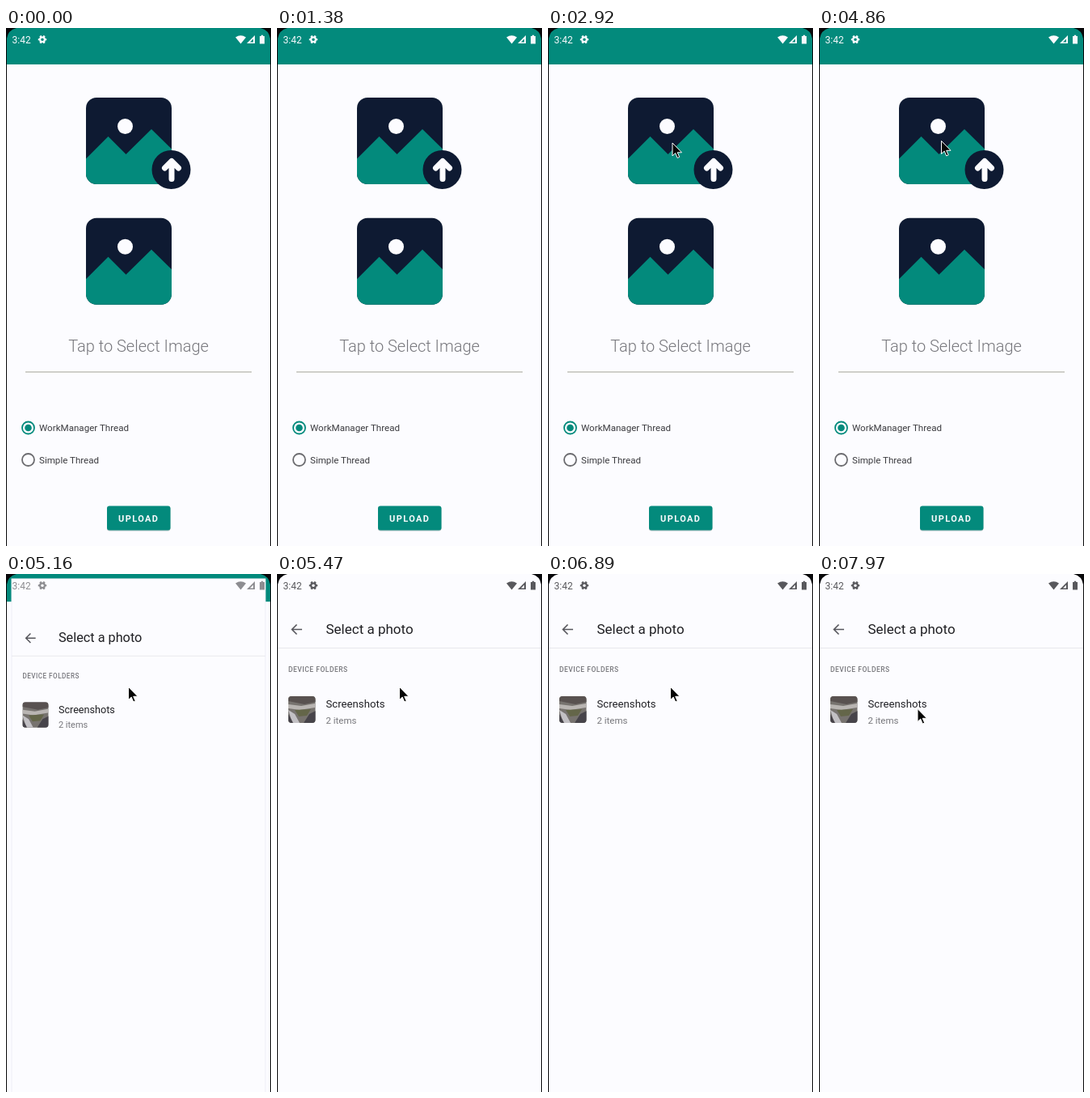
Write an HTML page that moves like this. It is 328x640 px and loops after 7990 ms.

```html
<!DOCTYPE html>
<html lang="en">
<head>
<meta charset="utf-8">
<title>Image upload</title>
<style>
  html, body { margin: 0; width: 100%; height: 100%; overflow: hidden; background: #fcfcff; }
  svg { display: block; width: 328px; height: 640px; font-family: Roboto, sans-serif;
    --paper: #fcfcff; --teal: #038a7c; --navy: #0e1a32; --ink: #202024; --grey: #77777c; }
  .paper { fill: var(--paper); }
  .teal { fill: var(--teal); }
  .navy { fill: var(--navy); }
  .ink { fill: var(--ink); }
  .grey { fill: var(--grey); }
  .line { fill: none; }
</style>
</head>
<body>
<svg viewBox="0 0 328 640">
  <defs>
    <clipPath id="tile"><rect x="99" y="86" width="106" height="107" rx="13"/></clipPath>
    <clipPath id="thumb"><rect x="14" y="151" width="33.5" height="33" rx="4"/></clipPath>
    <g id="picture">
      <g clip-path="url(#tile)">
        <rect class="navy" x="99" y="85" width="107" height="109"/>
        <path class="teal" d="M99 161.500L126.500 134L148.500 156L180 125L206 150.500V194H99Z"/>
      </g>
      <circle class="paper" cx="147.500" cy="121.500" r="9.500"/>
    </g>
  </defs>

  <g id="home">
    <rect class="paper" width="328" height="640"/>
    <rect class="teal" y="-20" width="328" height="65"/>
    <use href="#picture"/>
    <use href="#picture" y="148.700"/>
    <circle class="navy" cx="204.500" cy="175" r="24"/>
    <path class="line" d="M205 186.500V166M196.500 173L205 164.500L213.500 173" stroke="#fcfcff"
      stroke-width="7" stroke-linecap="round" stroke-linejoin="round"/>
    <text class="grey" x="164" y="400" font-size="20" font-weight="300" text-anchor="middle">Tap to Select Image</text>
    <rect x="24" y="424" width="280" height="2" fill="#cfcfca"/>
    <circle class="line" cx="27.500" cy="494" r="7.500" stroke="#038a7c" stroke-width="1.800"/>
    <circle class="teal" cx="27.500" cy="494" r="4.300"/>
    <circle class="line" cx="27.500" cy="533.500" r="7.500" stroke="#6c6c70" stroke-width="1.800"/>
    <g font-size="11.600" fill="#3c3c40">
      <text x="41" y="498">WorkManager Thread</text>
      <text x="41" y="537.500">Simple Thread</text>
    </g>
    <rect x="125" y="591.500" width="78.500" height="30" rx="3" fill="#b8c6c8"/>
    <rect class="teal" x="125" y="590.500" width="78.500" height="30" rx="3"/>
    <text class="paper" x="139" y="610" font-size="11" font-weight="700" letter-spacing="1.400">UPLOAD</text>
  </g>

  <g id="picker">
    <rect class="paper" y="-8" width="328" height="680" stroke="#efeff6"/>
    <path class="line" d="M31 68.500H19M24.500 62.500L18.500 68.500L24.500 74.500" stroke="#56565c" stroke-width="1.600"/>
    <text class="ink" x="60.500" y="74" font-size="17">Select a photo</text>
    <rect y="91" width="328" height="1" fill="#e8e8ec"/>
    <text class="grey" x="14" y="121" font-size="8.500" font-weight="500" letter-spacing=".5">DEVICE FOLDERS</text>
    <g clip-path="url(#thumb)">
      <rect x="14" y="151" width="34" height="34" fill="#77736f"/>
      <path d="M14 151H48V158L34 161L14 157Z" fill="#595250"/>
      <path d="M14 161L30 163L47 160V165L28 168L14 166Z" fill="#b9b5b2"/>
      <path d="M22 168L42 167L37 175L27 176Z" fill="#646649"/>
      <path d="M14 168L22 173L28 184H19Z" fill="#c2c0c4"/>
      <path d="M14 173L20 184H14ZM40 173L48 169V184H33Z" fill="#47444a"/>
    </g>
    <text class="ink" x="60.500" y="165" font-size="13.200">Screenshots</text>
    <text class="grey" x="60.500" y="184.500" font-size="11.500">2 items</text>
  </g>

  <g id="status" fill="currentColor">
    <text x="7.500" y="18.500" font-size="12">3:42</text>
    <circle class="line" cx="45" cy="14.200" r="2.900" stroke="currentColor" stroke-width="2.200"/>
    <circle class="line" cx="45" cy="14.200" r="4.400" stroke="currentColor" stroke-width="1.700"
      pathLength="12" stroke-dasharray="1" stroke-dashoffset=".5"/>
    <path d="M284 11.500Q290.500 7 297 11.500L290.500 19.500Z"/>
    <path d="M308 9V19H298ZM306 13.500L302 17.500H306Z" fill-rule="evenodd"/>
    <path d="M314 10H315.800V8.800H318.200V10H320V19.500H314Z"/>
  </g>

  <path d="M0 0H13Q2.500 2.500 1 13V640H0ZM328 0H315Q325.500 2.500 327 13V640H328Z" fill="#08080a"/>
  <path id="cursor" d="M0 0V16L3.700 12.600L6.200 18.500L8.700 17.400L6.200 11.800H11.500Z" fill="#050505" stroke="#fff"/>
</svg>

<script>
const LOOP = 7990;
const OPEN_AT = 5053;
const [home, picker, status, cursor] =
  ['home', 'picker', 'status', 'cursor'].map(id => document.getElementById(id));

// Pointer stops: time, x, y
const stops = [
  [2380, 328, 230], [2860, 154, 142], [3150, 154, 142], [3400, 151.5, 139.5],
  [7320, 151.5, 139.5], [7720, 122, 166.5], [LOOP, 122, 166.5]
];

const progress = (t, start, length) => Math.min(1, Math.max(0, (t - start) / length));
const smooth = p => p * p * (3 - 2 * p);
const mix = (a, b, p) => a + (b - a) * p;
const scaleFromCentre = s => `translate(164 320) scale(${s}) translate(-164 -320)`;

function placeCursor(t) {
  const next = stops.findIndex(stop => t < stop[0]);
  cursor.style.display = next > 0 ? '' : 'none';
  if (next < 1) return;
  const [t0, x0, y0] = stops[next - 1];
  const [t1, x1, y1] = stops[next];
  const p = smooth(progress(t, t0, t1 - t0));
  cursor.setAttribute('transform', `translate(${mix(x0, x1, p)} ${mix(y0, y1, p)})`);
}

function draw(t) {
  const opened = 1 - (1 - progress(t, OPEN_AT, 400)) ** 4;
  home.setAttribute('transform', scaleFromCentre(mix(1, 1.055, opened)));
  picker.setAttribute('transform', scaleFromCentre(mix(0.85, 1, opened)));
  picker.setAttribute('opacity', progress(t, OPEN_AT + 20, 88));

  const level = mix(250, 88, progress(t, OPEN_AT, 160));
  status.style.color = `rgb(${level} ${level} ${level + 4})`;
  placeCursor(t);
}

const began = performance.now();
function frame() {
  draw((performance.now() - began) % LOOP);
  requestAnimationFrame(frame);
}
frame();
</script>
</body>
</html>
```
